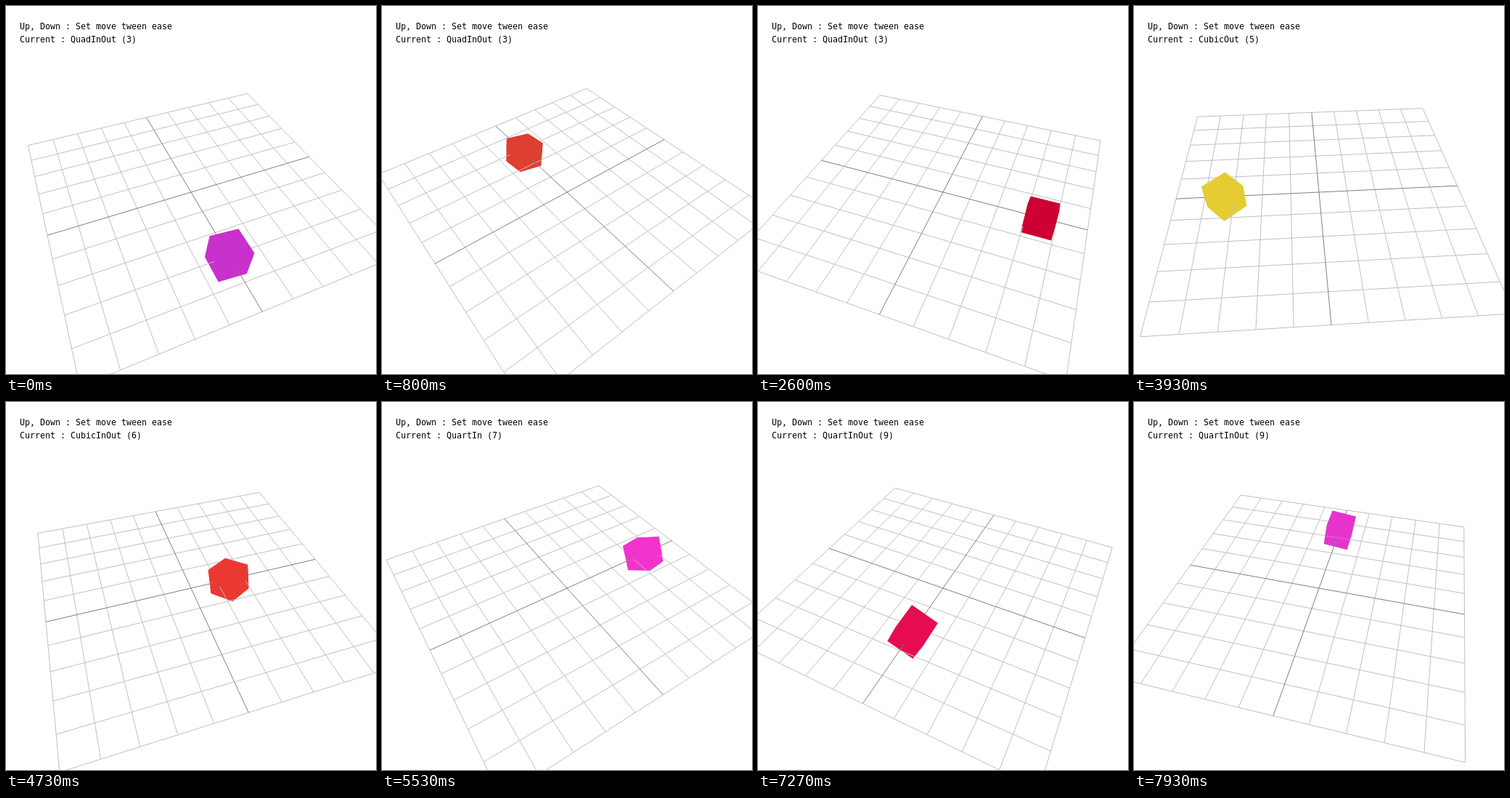
Write an HTML page with a canvas that moves like this. It is 510 px wide and 506 px high and loops after 8000 ms.

```html
<!DOCTYPE html>
<html lang="en">
<head>
<meta charset="utf-8">
<title>Tween ease</title>
<style>
  html, body { margin: 0; width: 100%; height: 100%; overflow: hidden; background: #fff; }
  canvas { position: absolute; left: 0; top: 0; }
  #label {
    position: absolute; left: 19px; top: 19px; margin: 0; color: #000;
    font: 11.63px/18px "DejaVu Sans Mono", "Noto Sans Mono", monospace;
  }
</style>
</head>
<body>
<canvas id="stage" width="510" height="506"></canvas>
<pre id="label">Up, Down : Set move tween ease
Current : <span id="ease">QuadInOut (3)</span></pre>
<script>
const ctx = document.getElementById('stage').getContext('2d');
const easeLabel = document.getElementById('ease');

const LOOP = 8000, STEPS = 120, FPS = 15;
const RAD = Math.PI / 180;
const DIST = 10 * Math.SQRT2, FOCAL = 256 / Math.tan(25 * RAD), TILT = Math.SQRT1_2;
const CENTER = { x: 255, y: 256 };
const REACH = 3.52, LEG = 1.4, LEG_OFFSET = 0.2;

const easeIn = n => p => p ** n;
const easeOut = n => p => 1 - (1 - p) ** n;
const easeInOut = n => p => p < 0.5 ? (2 * p) ** n / 2 : 1 - (2 - 2 * p) ** n / 2;

const eases = [
  { from: 0, name: 'QuadInOut (3)', fn: easeInOut(2) },
  { from: 2.92, name: 'CubicIn (4)', fn: easeIn(3) },
  { from: 3.72, name: 'CubicOut (5)', fn: easeOut(3) },
  { from: 4.65, name: 'CubicInOut (6)', fn: easeInOut(3) },
  { from: 5.39, name: 'QuartIn (7)', fn: easeIn(4) },
  { from: 6.32, name: 'QuartOut (8)', fn: easeOut(4) },
  { from: 7.25, name: 'QuartInOut (9)', fn: easeInOut(4) },
];

// time, roll, pitch, yaw, hue, saturation, lightness
const poses = [
  [0, -8, 0, 0, -61, 61, 49.6],
  [1.6, -17, -13, 2, 71, 84.6, 56.7],
  [2.6, -30, 0, 0, -14.6, 100, 40],
  [3.933, 0, 0, 43, 51.6, 77.4, 54.9],
  [5.533, -27, 11, 21, -48, 88, 57.5],
  [6.6, -50, 0, 0, 15, 100, 40],
  [7.933, -83, 0, 0, -51.3, 78, 55.1],
];

function poseAt(t) {
  const next = poses.findIndex(k => k[0] > t);
  if (next < 0) return poses[poses.length - 1];
  const a = poses[next - 1], b = poses[next];
  const p = (t - a[0]) / (b[0] - a[0]);
  return a.map((value, i) => value + (b[i] - value) * p);
}

function turn(a, b, degrees) {
  const c = Math.cos(degrees * RAD), s = Math.sin(degrees * RAD);
  return [a * c - b * s, a * s + b * c];
}

function project([x, y, z], angle) {
  const c = Math.cos(angle), s = Math.sin(angle);
  const side = x * c + z * s, ahead = x * s - z * c;
  const scale = FOCAL / (DIST + (ahead - y) * TILT);
  return [CENTER.x + side * scale, CENTER.y - (ahead + y) * TILT * scale];
}

function cubeCorners(offset, roll, pitch, yaw) {
  return Array.from({ length: 8 }, (_, i) => {
    let x = (i & 1) - 0.5, y = (i >> 1 & 1) - 0.5, z = (i >> 2) - 0.5;
    [y, z] = turn(y, z, pitch);
    [x, y] = turn(x, y, roll);
    [z, x] = turn(z, x, yaw);
    return [x, y, z + offset];
  });
}

// The part of the cube that stands above the floor
function aboveFloor(corners) {
  const points = corners.filter(c => c[1] >= 0);
  corners.forEach((a, i) => [1, 2, 4].forEach(bit => {
    const b = corners[i ^ bit];
    if (i & bit || a[1] * b[1] >= 0) return;
    const p = a[1] / (a[1] - b[1]);
    points.push(a.map((value, k) => value + (b[k] - value) * p));
  }));
  return points;
}

function hull(points) {
  const sorted = [...points].sort((a, b) => a[0] - b[0] || a[1] - b[1]);
  const half = list => {
    const chain = [];
    for (const p of list) {
      while (chain.length > 1) {
        const [a, b] = chain.slice(-2);
        if ((b[0] - a[0]) * (p[1] - a[1]) - (b[1] - a[1]) * (p[0] - a[0]) > 0) break;
        chain.pop();
      }
      chain.push(p);
    }
    return chain.slice(0, -1);
  };
  return [...half(sorted), ...half(sorted.reverse())];
}

function fillSolid(points, angle, color) {
  ctx.beginPath();
  hull(points.map(p => project(p, angle))).forEach(p => ctx.lineTo(...p));
  ctx.fillStyle = color;
  ctx.fill();
}

function drawGrid(angle) {
  const line = (a, b) => {
    ctx.moveTo(...project(a, angle));
    ctx.lineTo(...project(b, angle));
  };
  const pair = i => {
    line([i, 0, -5], [i, 0, 5]);
    line([-5, 0, i], [5, 0, i]);
  };
  ctx.lineWidth = 1;
  ctx.strokeStyle = '#bfbfbf';
  ctx.beginPath();
  for (let i = -5; i <= 5; i++) if (i) pair(i);
  ctx.stroke();
  ctx.strokeStyle = '#7f7f7f';
  ctx.beginPath();
  pair(0);
  ctx.stroke();
}

function draw(t) {
  const angle = (22.95 + 18 * t) * RAD;
  const ease = eases.filter(e => e.from <= t).pop();
  const legs = LEG_OFFSET + t / LEG, leg = Math.floor(legs);
  const travel = REACH * (1 - 2 * ease.fn(legs - leg));
  const [, roll, pitch, yaw, h, s, l] = poseAt(t);
  const color = `hsl(${(h + 360) % 360}, ${s}%, ${l}%)`;
  const corners = cubeCorners(leg % 2 ? -travel : travel, roll, pitch, yaw);

  ctx.clearRect(0, 0, 510, 506);
  fillSolid(corners, angle, color);
  drawGrid(angle);
  fillSolid(aboveFloor(corners), angle, color);
  if (easeLabel.textContent !== ease.name) easeLabel.textContent = ease.name;
}

const start = performance.now();
function tick() {
  const elapsed = (performance.now() - start) % LOOP;
  draw(Math.floor(elapsed * STEPS / LOOP + 0.06) % STEPS / FPS);
  requestAnimationFrame(tick);
}
tick();
</script>
</body>
</html>
```
